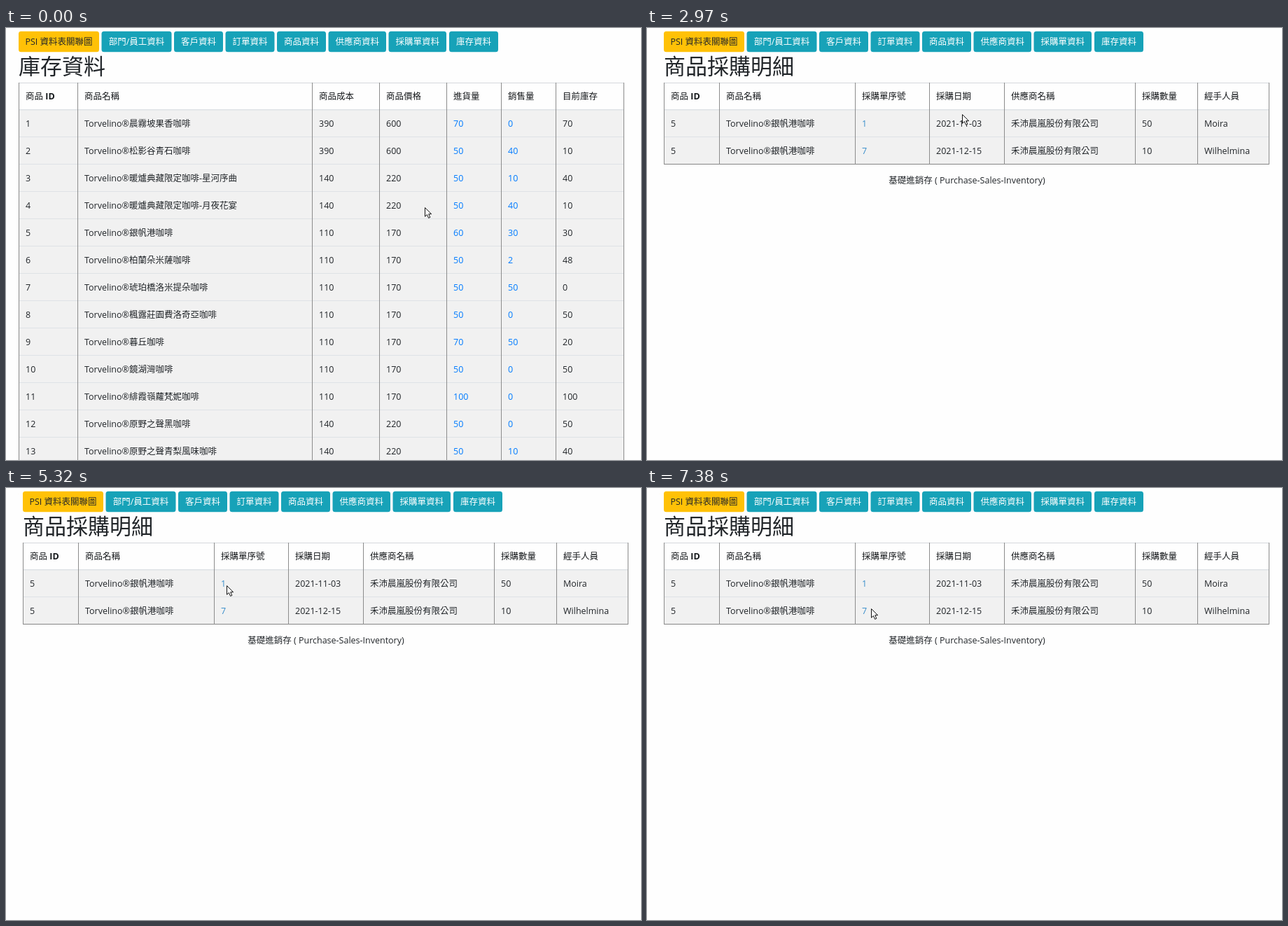
An HTML page that plays this animation: 907 px wide and 617 px high, repeating every 7990 ms.

```html
<!DOCTYPE html>
<html lang="zh-Hant">
<head>
<meta charset="utf-8">
<style>
  html, body { margin: 0; width: 100%; height: 100%; overflow: hidden; background: #fefefe; }
  svg { display: block; }
  text { font: 12.5px "Open Sans", "Noto Sans CJK TC", "Noto Sans CJK", "Noto Sans", sans-serif; fill: #212529; white-space: pre; }
  .title { font-size: 31px; font-weight: 300; }
</style>
</head>
<body>
<svg id="stage" width="907" height="617" viewBox="0 0 907 617">
  <rect width="907" height="617" fill="#fefefe"/>
  <g id="pages"></g>
  <g id="cursor">
    <path id="arrow" d="M.5.6V13.2L3.4 10.5 5.6 15.4 7.8 14.4 5.7 9.7H9.6Z" fill="#fff" stroke="#111"/>
    <path id="hand" d="M-1.5 11V1.5Q-1.5.4 0 .4T1.5 1.5V6Q4.2 5 4.5 7 7 6.2 7.3 8 9.7 7.4 9.7 9.5V13Q9.5 15.5 8 18.3H0L-4.5 12Q-5.3 10.2-3.8 9.8-2.8 9.8-1.5 11Z" fill="#fff" stroke="#111"/>
    <path id="beam" d="M-2.5-6.5H2.5M0-6.5V6.5M-2.5 6.5H2.5" fill="none" stroke="#444"/>
  </g>
</svg>
<script>
const LOOP = 7990;
const BLUE = '#007bff', RED = '#dc3545', TEAL = '#17a2b8', AMBER = '#ffc107';
const BRAND = 'Torvelino®';
const SUPPLIER = '禾沛晨嵐股份有限公司';
const el = id => document.getElementById(id);

// name, cost, purchased, sold
const products = [
  ['晨霧坡果香咖啡', 390, 70, 0],
  ['松影谷青石咖啡', 390, 50, 40],
  ['暖爐典藏限定咖啡-星河序曲', 140, 50, 10],
  ['暖爐典藏限定咖啡-月夜花宴', 140, 50, 40],
  ['銀帆港咖啡', 110, 60, 30],
  ['柏蘭朵米薩咖啡', 110, 50, 2],
  ['琥珀橋洛米提朵咖啡', 110, 50, 50],
  ['楓露莊園費洛奇亞咖啡', 110, 50, 0],
  ['暮丘咖啡', 110, 70, 50],
  ['鏡湖灣咖啡', 110, 50, 0],
  ['緋霞嶺蘿梵妮咖啡', 110, 100, 0],
  ['原野之聲黑咖啡', 140, 50, 0],
  ['原野之聲青梨風味咖啡', 140, 50, 10]
];
const priceOf = { 390: 600, 140: 220, 110: 170 };
const fullName = id => BRAND + products[id - 1][0];

const rect = (x, y, w, h, fill, r = 0) =>
  `<rect x="${x}" y="${y}" width="${w}" height="${h}" rx="${r}" fill="${fill}"/>`;
const text = (x, mid, s, attrs = '') => `<text x="${x}" y="${mid + 4.6}" ${attrs}>${s}</text>`;
const title = (x, mid, s) => `<text class="title" x="${x}" y="${mid + 11.5}">${s}</text>`;
const button = (x, y, w, label, fill, ink = '#fff') =>
  rect(x, y, w, 29.5, fill, 3.5) +
  text(x + w / 2, y + 14.7, label, `text-anchor="middle" style="fill:${ink}"`);
const footer = mid => text(457, mid, '基礎進銷存 ( Purchase-Sales-Inventory)', 'text-anchor="middle"');

function nav(left) {
  const items = [['PSI 資料表關聯圖', 0, 115], ['部門/員工資料', 118.5, 100], ['客戶資料', 222, 70],
    ['訂單資料', 295.5, 70], ['商品資料', 369, 70], ['供應商資料', 442.5, 82.5],
    ['採購單資料', 528.5, 82.5], ['庫存資料', 615, 70]];
  return items.map(([label, x, w], i) =>
    button(left + x, 4.7, w, label, i ? TEAL : AMBER, i ? '#fff' : '#212529')).join('');
}

function table(cols, top, head, rows, { rowH = 39, striped = false, links = [], linkInk = BLUE } = {}) {
  const left = cols[0], width = cols[cols.length - 1] - left;
  const body = top + 39, bottom = body + rows.length * rowH;
  let out = '';
  rows.forEach((row, r) => {
    const y = body + r * rowH;
    if (!striped || r % 2 === 0) out += rect(left, y, width, rowH, '#f1f1f1');
    out += rect(left, y - 1, width, r ? 1 : 1.5, '#dee2e6');
    row.forEach((cell, c) => {
      const x = cols[c] + 10;
      if (cell === '編輯') out += button(x, y + 10.5, 45, cell, BLUE);
      else if (cell === '刪除') out += button(x, y + 10.5, 45, cell, RED);
      else out += text(x, y + 19.6, cell, links.includes(c) ? `style="fill:${linkInk}"` : '');
    });
  });
  head.forEach((label, c) => {
    const html = label.replace('ID', '<tspan font-weight="700">ID</tspan>');
    out += text(cols[c] + 10, top + 19.5, html, 'style="fill:#15181b"');
  });
  out += rect(left, top, width, 1, '#d4d8dc') + rect(left, bottom - 1, width + 1, 1, '#858585');
  return out + cols.map(x => rect(x, top, 1, bottom - top, '#8c8c8c')).join('');
}

function stockPage() {
  const rows = products.map(([, cost, bought, sold], i) =>
    [i + 1, fullName(i + 1), cost, priceOf[cost], bought, sold, bought - sold]);
  return nav(18) + title(18, 54, '庫存資料') +
    table([18, 102, 437, 533, 629, 707, 785, 882], 78,
      ['商品 ID', '商品名稱', '商品成本', '商品價格', '進貨量', '銷售量', '目前庫存'],
      rows, { links: [4, 5] });
}

function purchasesPage() {
  const row = (order, date, count, clerk) => [5, fullName(5), order, date, SUPPLIER, count, clerk];
  return nav(24) + title(24, 54, '商品採購明細') +
    table([24, 103, 297, 403, 510, 697, 786, 888], 78,
      ['商品 ID', '商品名稱', '採購單序號', '採購日期', '供應商名稱', '採購數量', '經手人員'],
      [row(1, '2021-11-03', 50, 'Moira'), row(7, '2021-12-15', 10, 'Wilhelmina')],
      { links: [2], linkInk: '#3a8fcb' }) + footer(217);
}

function orderPage(left, summary, cols, firstId, lines) {
  const rows = lines.map(([id, name, price, count], i) =>
    [i, firstId + i, id, name, price, count, price * count, '編輯', '刪除']);
  return nav(left) + title(left, 54, '採購單主檔資料') +
    table([0, 125, 251, 470, 589, 657, 738, 864].map(x => x + left), 78,
      ['採購單序號', '採購日期', '供應商', '採購員工', '數量', '總價', '預計出貨日'], [summary]) +
    title(left, 188, '採購單明細') + button(left + 164.5, 176.7, 70, '新增明細', BLUE) +
    table(cols, 212,
      ['序號', '明細序號', '商品序號', '商品名稱', '商品成本', '數量', '小計', '編輯', '刪除'],
      rows, { rowH: 49.2, striped: true }) + footer(274 + lines.length * 49.2);
}

const line = (id, count) => [id, fullName(id), priceOf[products[id - 1][1]], count];
const pages = {
  stock: stockPage(),
  purchases: purchasesPage(),
  firstOrder: orderPage(18, [1, '2021-11-03', SUPPLIER, 'Moira', 10, 133000, '2021-11-09'],
    [18, 71, 155, 238, 528, 611, 665, 728, 805, 882], 1,
    products.slice(0, 10).map((_, i) => line(i + 1, 50))),
  lastOrder: orderPage(24, [7, '2021-12-15', SUPPLIER, 'Wilhelmina', 5, 64450, '2021-12-21'],
    [24, 82, 171, 262, 504, 594, 652, 721, 804, 888], 39,
    [line(1, 20), line(5, 10), line(9, 20), line(11, 50),
      [33, '禾沛暖爐濃縮咖啡-雲嶺限定版', 777, 50]])
};
el('pages').innerHTML = Object.entries(pages)
  .map(([name, html]) => `<g id="${name}">${html}</g>`).join('');

// time, page, opacity
const views = [
  [0, 'stock', 1], [1410, 'stock', .35], [1480, 'stock', .03], [1540, 'purchases', 1],
  [3920, 'purchases', .35], [3990, 'purchases', 0], [4060, 'firstOrder', 1],
  [5180, 'firstOrder', .35], [5250, 'firstOrder', .03], [5320, 'purchases', 1],
  [6450, 'lastOrder', 1], [7170, 'purchases', 1]
];
// time, pointer shape, opacity
const pointers = [
  [0, 'arrow', 1], [870, 'hand', 1], [1410, 'hand', .6], [1540, 'hand', 1], [1610, 'arrow', 1],
  [3650, 'hand', 1], [3990, 'beam', .45], [4060, 'beam', 1], [5320, 'arrow', 1],
  [5960, 'hand', 1], [6450, 'arrow', 1]
];
// start, last step, step count, waypoints
const moves = [
  [520, 940, 7, [[598, 256], [625, 275], [645, 289]]],
  [1940, 2690, 12, [[645, 289], [650, 245], [645, 190], [645, 147]]],
  [2760, 3510, 12, [[645, 147], [450, 123], [345, 118], [319, 133]]],
  [3580, 3720, 3, [[319, 133], [313, 139]]],
  [5320, 5320, 1, [[313, 139], [315, 139]]],
  [5390, 5960, 9, [[315, 139], [317, 156], [311, 171]]],
  [6030, 6030, 1, [[311, 171], [310, 174]]],
  [6180, 6250, 2, [[310, 174], [307, 165], [309, 172]]],
  [6450, 6450, 1, [[309, 172], [311, 174]]],
  [7240, 7380, 3, [[311, 174], [320, 172]]]
];

const latest = (list, t) => list.filter(item => item[0] <= t).pop();

function along(points, p) {
  const s = p * (points.length - 1), i = Math.min(Math.floor(s), points.length - 2);
  return points[i].map((v, axis) => v + (points[i + 1][axis] - v) * (s - i));
}

function pointerAt(t) {
  const move = latest(moves, t);
  if (!move) return moves[0][3][0];
  const [start, end, steps, points] = move;
  const gap = steps > 1 ? (end - start) / (steps - 1) : 1;
  const step = Math.min(steps, Math.floor((t - start) / gap + .001) + 1);
  return along(points, step / steps);
}

function render(t) {
  const [, page, pageAlpha] = latest(views, t);
  for (const name in pages) el(name).style.display = name === page ? '' : 'none';
  el(page).setAttribute('opacity', pageAlpha);

  const [, shape, shapeAlpha] = latest(pointers, t);
  for (const name of ['arrow', 'hand', 'beam']) el(name).style.display = name === shape ? '' : 'none';
  const [x, y] = pointerAt(t).map(Math.round);
  el('cursor').setAttribute('transform', `translate(${x} ${y})`);
  el('cursor').setAttribute('opacity', shapeAlpha);
}

const origin = performance.now();
function tick() {
  render((performance.now() - origin) % LOOP);
  requestAnimationFrame(tick);
}
tick();
</script>
</body>
</html>
```
